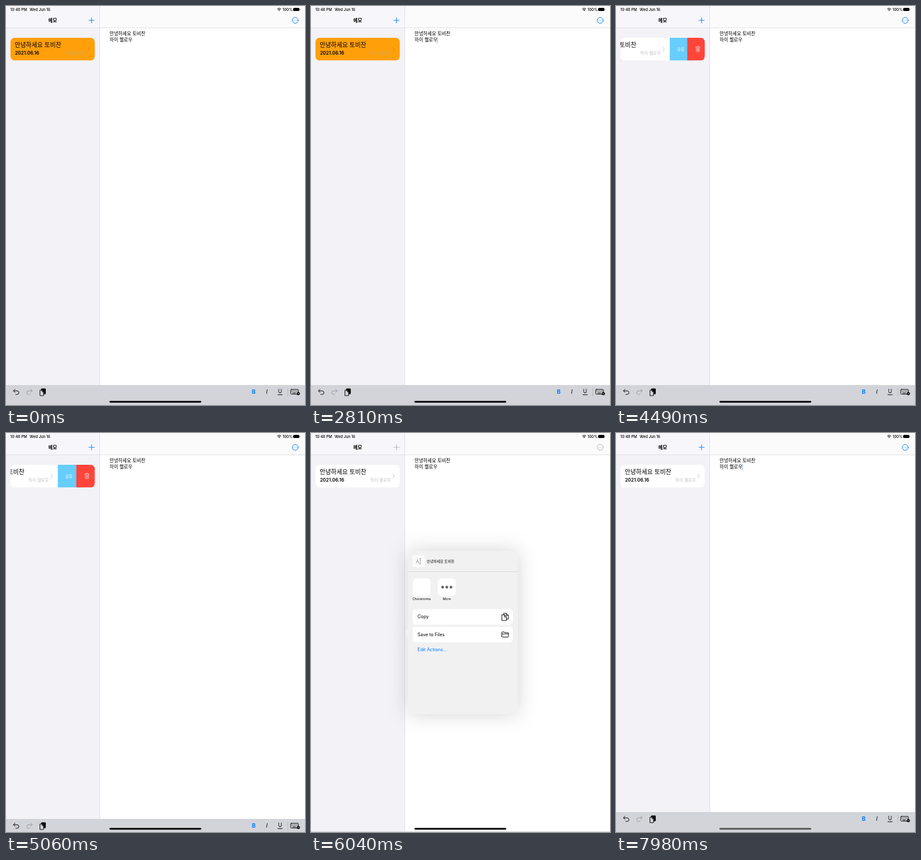
An HTML page for the animation above (8 s loop, 480x640 px).

```html
<!DOCTYPE html>
<html lang="ko">
<meta charset="utf-8">
<title>Memo</title>
<style>
  html, body { margin: 0; width: 100%; height: 100%; overflow: hidden; background: #fff; }
  svg { display: block; width: 100vw; height: 100vh; --tint: #007aff; }
  text { font-family: Inter, "Noto Sans CJK KR", "Noto Sans CJK", sans-serif; white-space: pre; }
  .ko { font-family: "Noto Sans CJK KR", "Noto Sans CJK", sans-serif; }
  .line { fill: none; stroke: #000; stroke-width: .9; stroke-linecap: round; stroke-linejoin: round; }
  .tint { stroke: var(--tint); }
  .mid { text-anchor: middle; }
  #popover { filter: drop-shadow(0 0 16px rgba(0, 0, 0, .17)); }
</style>

<svg viewBox="0 0 480 640">
  <defs>
    <clipPath id="cardShape"><rect x="7.2" y="51" width="135.3" height="36.3" rx="6.5"/></clipPath>
  </defs>

  <!-- Panes and navigation bars -->
  <rect width="480" height="640" fill="#fff"/>
  <rect width="150" height="640" fill="#f2f2f7"/>
  <rect width="150" height="35" fill="#f7f7fb"/>
  <rect x="151" width="329" height="35" fill="#fbfbfc"/>
  <path d="M0 35H480M150.5 0V640" stroke="#dcdce1" stroke-width=".8"/>

  <g font-size="6" font-weight="500">
    <text x="7" y="7.6">10:48 PM</text>
    <text x="38" y="7.6">Wed Jun 16</text>
    <text x="444" y="7.6">100%</text>
  </g>
  <path class="line" d="M435.7 4.5Q438.5 2.1 441.3 4.5M436.9 5.9Q438.5 4.5 440.1 5.9"/>
  <circle cx="438.5" cy="7.2" r=".8"/>
  <rect x="461" y="3" width="10" height="5" rx="1.5"/>
  <path d="M471.8 4.5q1.2 1 0 2z"/>

  <text class="ko mid" x="75" y="25.8" font-size="7.5" font-weight="700">메모</text>
  <path class="line tint" d="M133 23H141.6M137.3 18.7V27.3"/>
  <circle class="line tint" cx="464.3" cy="23" r="4.7"/>
  <path class="line tint" stroke-width="1.3" d="M462 23h.01M464.3 23h.01M466.6 23h.01"/>

  <!-- Note text -->
  <g class="ko" font-size="7.5" font-weight="500">
    <text class="ko" x="166.3" y="47">안녕하세요 토비찬</text>
    <text class="ko" x="166.3" y="57.4">하이 헬로우</text>
  </g>
  <rect id="caret" x="202.3" y="49.3" width="1" height="10.7" fill="var(--tint)"/>

  <!-- Note list row with swipe actions -->
  <g clip-path="url(#cardShape)">
    <rect id="card" x="7" y="51" width="136" height="37"/>
    <g id="row">
      <text class="ko" x="14" y="65.6" font-size="9.8">안녕하세요 토비찬</text>
      <text x="14.4" y="78.4" font-size="7.5" font-weight="600">2021.06.16</text>
      <text id="preview" class="ko" x="95" y="78" font-size="6.8">하이 헬로우</text>
      <path id="chevron" class="line" d="M131.3 66.3L134 69.2L131.3 72.1"/>
    </g>
    <g id="share">
      <rect y="51" width="40" height="37" fill="#66cdfc"/>
      <text class="ko" x="11.8" y="71.6" font-size="6.5" font-weight="500" fill="#fff">공유</text>
    </g>
    <g id="trash">
      <rect y="51" width="40" height="37" fill="#ff453a"/>
      <path class="line" style="stroke:#e5c5c2;stroke-width:.8" d="M13.5 66H20.7M15.6 65.8V64.7H18.6V65.8M14.3 66.2L14.8 73.3H19.4L19.9 66.2M16 67.8V71.7M17.1 67.8V71.7M18.2 67.8V71.7"/>
    </g>
  </g>

  <!-- Keyboard accessory bar -->
  <g id="toolbar">
    <rect y="608" width="480" height="40" fill="#d2d4d9"/>
    <path id="undo" class="line" d="M14.5 614.7L12 617.3L14.5 619.9M12.2 617.3H18Q20.8 617.7 20.8 620.2Q20.8 623 17.7 623H15.7"/>
    <path class="line" style="stroke:#96989d" d="M39.5 614.7L42 617.3L39.5 619.9M41.8 617.3H36Q33.2 617.7 33.2 620.2Q33.2 623 36.3 623H38.3"/>
    <rect x="56.4" y="613.5" width="7.4" height="9.2" rx="1.2"/>
    <path d="M54.5 616.2H58.2L60.3 618.4V625H54.5z" fill="#d2d4d9" stroke="#000" stroke-width=".9"/>
    <path class="line" d="M57.9 616.4V618.7H60"/>
    <g class="mid" font-size="9">
      <text x="397.8" y="622.2" font-weight="700" fill="#007aff">B</text>
      <text x="418.8" y="622.2" font-style="italic" font-family="Liberation Serif, serif">I</text>
      <text x="440" y="621.4" font-size="8.6">U</text>
    </g>
    <path class="line" d="M436.5 623.6H443.5"/>
    <path d="M452.5 613V626" stroke="#b4b6bb" stroke-width=".8"/>
    <rect class="line" x="457" y="615" width="12.4" height="7.6" rx="1.2"/>
    <path class="line" stroke-dasharray=".8 1.3" style="stroke-linecap:butt" d="M458.6 617H468.6M458.6 618.8H468.6"/>
    <path class="line" d="M460.4 620.8H465"/>
    <circle cx="469.3" cy="621.8" r="2.5"/>
    <path d="M468 621.8H470.6" stroke="#fff" stroke-width=".7"/>
  </g>

  <!-- Share sheet -->
  <g id="popover">
    <path d="M162 189H326Q332 189 332 195V445Q332 451 326 451H162Q156 451 156 445V328L151.5 320L156 312V195Q156 189 162 189z" fill="#f1f1f2"/>
    <path d="M156 222.5H332" stroke="#d6d6d9" stroke-width=".8"/>
    <rect x="163" y="196" width="20" height="19.5" rx="2" fill="#fafafa"/>
    <text x="168.6" y="208.6" font-size="7.5" fill="#8a8a8e">A</text>
    <path class="line" style="stroke:#8a8a8e;stroke-width:.7" d="M174.2 201.7H176.4M175.3 201.7V210M174.2 210H176.4"/>
    <text class="ko" x="185.8" y="207.9" font-size="5.8">안녕하세요 토비찬</text>
    <g fill="#fff">
      <rect x="163.2" y="233" width="28.8" height="28.8" rx="6.5"/>
      <rect x="203.6" y="233" width="28.8" height="28.8" rx="6.5"/>
      <rect x="163" y="282.5" width="161" height="25" rx="5"/>
      <rect x="163" y="310.8" width="161" height="25" rx="5"/>
    </g>
    <path class="line" style="stroke:#666;stroke-width:4.4" d="M211.3 247.2h.01M218 247.2h.01M224.7 247.2h.01"/>
    <g class="mid" font-size="5.3">
      <text x="177.5" y="268.4">Chorenoma</text>
      <text x="218" y="268.4">More</text>
    </g>
    <g font-size="7.3">
      <text x="171" y="297.4">Copy</text>
      <text x="171" y="325.6">Save to Files</text>
      <text x="171" y="350.4" fill="#007aff">Edit Actions…</text>
    </g>
    <path class="line" d="M309.2 291.2V289.2H313.6L316.8 292.4V298.4H313.8M313.4 289.4V292.5H316.6M306.8 291.6H310.6L313.8 294.8V300.8H306.8zM310.4 291.8V295H313.6"/>
    <path class="line" d="M306.3 326.3V320Q306.3 319 307.3 319H310L311 320.2H316Q317 320.2 317 321.2V326.3Q317 327.3 316 327.3H307.3Q306.3 327.3 306.3 326.3zM306.5 322.2H316.8"/>
  </g>

  <rect id="home" x="166" y="633.4" width="147.5" height="2.9" rx="1.45"/>
</svg>

<script>
  const LOOP = 8000, STEP = 110;
  const $ = id => document.getElementById(id);
  const svg = document.querySelector("svg");

  // Linear interpolation through [time, value] pairs
  function track(keys) {
    return t => {
      const i = keys.findIndex(k => k[0] > t);
      if (i === 0) return keys[0][1];
      if (i < 0) return keys[keys.length - 1][1];
      const [t0, a] = keys[i - 1], [t1, b] = keys[i];
      return a + (b - a) * (t - t0) / (t1 - t0);
    };
  }

  const swipe = track([[3720, 0], [4050, 32], [4270, 50], [4600, 59.3], [5050, 59.3],
                       [5160, 48], [5270, 24], [5380, 7.2], [5590, 3], [6030, 0]]);
  const barDrop = track([[4940, 0], [5050, 11], [5160, 24], [5270, 31], [6890, 31],
                         [7000, 25], [7110, 13], [7220, 4], [7330, 0]]);
  const popover = track([[5050, 0], [5160, .35], [5380, 1], [7000, 1], [7110, .86], [7440, 0]]);
  const dimmed = track([[5050, 0], [5380, 1], [7110, 1], [7660, 0]]);
  const homeGray = track([[6890, 0], [7110, 120], [7660, 85]]);

  // Motion advances in steps, restarted at the beginning of each gesture
  function stepped(t) {
    const start = [7000, 5590, 4720, 3830].find(s => t >= s) ?? 0;
    return start + Math.floor((t - start) / STEP) * STEP;
  }

  function caretAlpha(t) {
    if (t < 230 || (t >= 3950 && t < 7000)) return 0;
    if (t >= 7000) return t < 7980 ? 1 : .5;
    const phase = (t - 110) % 1020;
    return phase < 120 ? .5 : phase < 660 ? 1 : phase < 780 ? .5 : 0;
  }

  const move = (id, x, y = 0) => $(id).setAttribute("transform", `translate(${x} ${y})`);

  function draw(now) {
    const t = now % LOOP, s = stepped(t);
    const offset = swipe(s), alpha = popover(s), gray = homeGray(s);
    const selected = t < 3830;

    move("row", -offset);
    move("share", 142.5 - offset);
    move("trash", 142.5 - offset / 2);
    move("toolbar", 0, barDrop(s));

    $("card").style.fill = selected ? "#ff9f0a" : "#fff";
    $("preview").style.fill = selected ? "#d0a862" : "#c1c1c4";
    $("chevron").style.stroke = selected ? "#d58a1c" : "#c1c1c4";
    $("popover").style.opacity = alpha;
    $("popover").style.display = alpha ? "" : "none";
    $("caret").style.opacity = caretAlpha(t);
    $("home").style.fill = `rgb(${gray} ${gray} ${gray})`;
    svg.style.setProperty("--tint", `color-mix(in srgb, #b4b4b8 ${dimmed(s) * 100}%, #007aff)`);
    requestAnimationFrame(draw);
  }
  requestAnimationFrame(draw);
</script>
</html>
```
